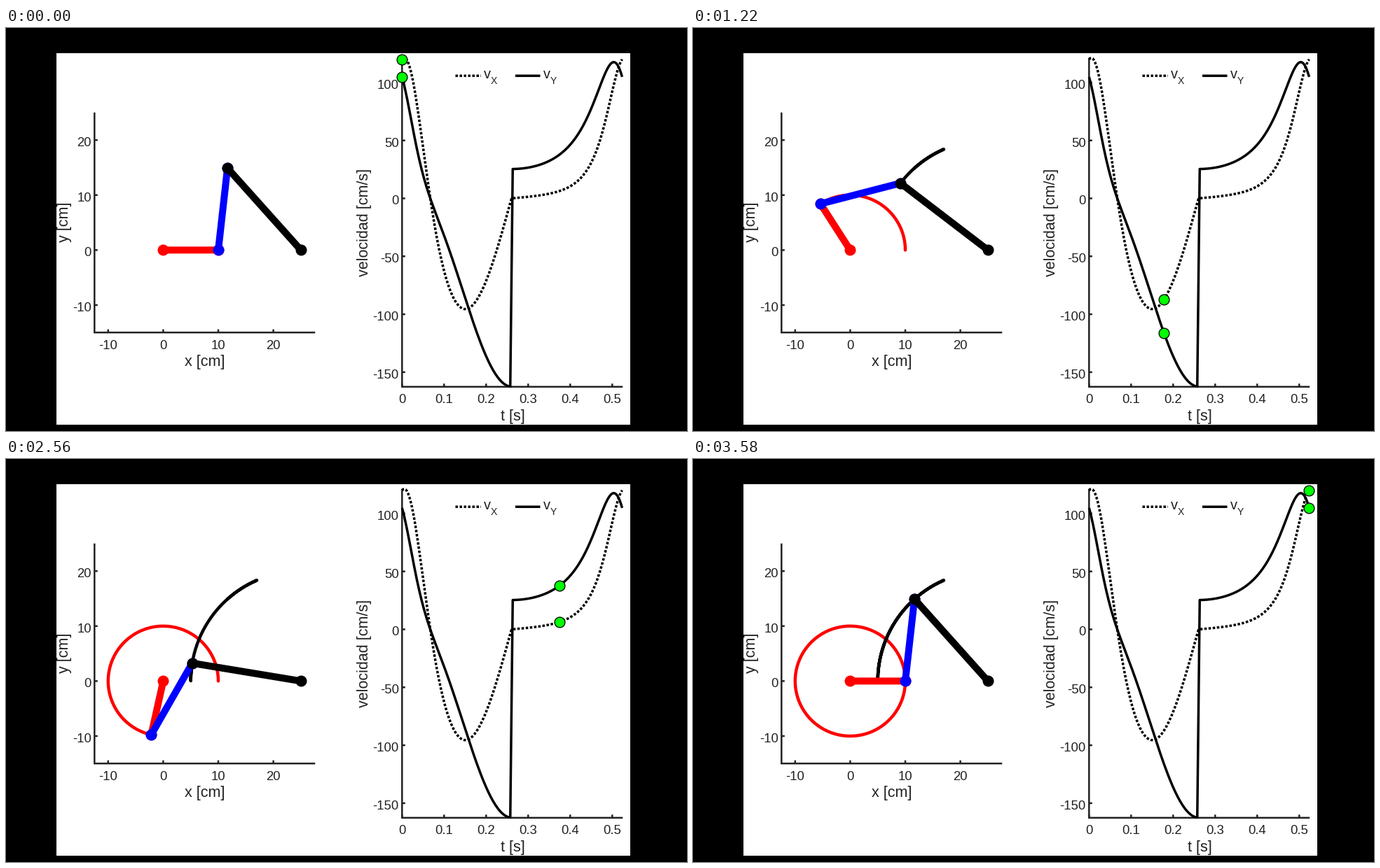
Recreate the animation shown at these times as a matplotlib script. Size 972x576 px, loop 3600 ms.

```python
import numpy as np
import matplotlib.pyplot as plt
from matplotlib.animation import FuncAnimation
from matplotlib.patches import Rectangle

W, H, DPI = 972, 576, 72          # at 72 dpi one point is one pixel
FRAMES, INTERVAL = 180, 20
INK = "#222222"

plt.rcParams["font.family"] = "Liberation Sans"

# Four-bar linkage, lengths in cm
CRANK, COUPLER, ROCKER, GROUND = 10, 15, 20, 25
OMEGA = 12                        # rad/s

theta = np.linspace(0, 2 * np.pi, FRAMES)
time = theta / OMEGA
crank_x, crank_y = CRANK * np.cos(theta), CRANK * np.sin(theta)

# Coupler-rocker joint: upper intersection of the two circles
dx, dy = GROUND - crank_x, -crank_y
dist = np.hypot(dx, dy)
along = (COUPLER**2 - ROCKER**2 + dist**2) / (2 * dist)
across = np.sqrt(np.maximum(COUPLER**2 - along**2, 0))
joint_x = crank_x + (along * dx - across * dy) / dist
joint_y = crank_y + (along * dy + across * dx) / dist


def velocity(pos):
    v = np.diff(pos) / np.diff(time)
    return np.append(v, v[0])


vx, vy = velocity(joint_x), velocity(joint_y)


# Data to pixel mappings
def arm_x(v):
    return 224.4 + 7.86 * np.asarray(v)


def arm_y(v):
    return 317.4 - 7.86 * np.asarray(v)


def vel_x(t):
    return 565.3 + 600 * np.asarray(t)


def vel_y(v):
    return 243.5 - 1.656 * np.asarray(v)


fig = plt.figure(figsize=(W / DPI, H / DPI), dpi=DPI, facecolor="black")
ax = fig.add_axes([0, 0, 1, 1])
ax.set_xlim(0, W)
ax.set_ylim(H, 0)
ax.axis("off")
ax.add_patch(Rectangle((72, 36), 819, 531, color="white", lw=0))


def line(x, y, color, lw, z=2, **kw):
    kw.setdefault("solid_capstyle", "butt")
    return ax.plot(x, y, color=color, lw=lw, zorder=z, snap=False, **kw)[0]


def label(x, y, text, size, ha="center", rotation=0):
    ax.text(x, y, text, size=size, color=INK, ha=ha, va="baseline",
            rotation=rotation, rotation_mode="anchor")


def axes_frame(left, right, top, bottom, xticks, yticks, to_x, to_y):
    line([left, left, right], [top, bottom, bottom], INK, 2.5,
         solid_capstyle="projecting", solid_joinstyle="miter")
    for v in xticks:
        x = to_x(v)
        line([x, x], [bottom, bottom - 4.5], INK, 2.5)
        label(x, bottom + 23.5, f"{v:g}", 18.5)
    for v in yticks:
        y = to_y(v)
        line([left, left + 4.5], [y, y], INK, 2.5)
        label(left - 4.5, y + 9, f"{v:g}", 18.5, ha="right")


axes_frame(126.3, 440, 122, 435.2, (-10, 0, 10, 20), (-10, 0, 10, 20),
           arm_x, arm_y)
label(283.5, 483, "x [cm]", 21.5)
label(89, 277.5, "y [cm]", 21.5, rotation=90)

axes_frame(565.3, 879, 44, 512.8, (0, 0.1, 0.2, 0.3, 0.4, 0.5),
           (-150, -100, -50, 0, 50, 100), vel_x, vel_y)
label(723, 560.5, "t [s]", 21.5)
label(516.5, 277.5, "velocidad [cm/s]", 21.5, rotation=90)

# Velocity curves and legend
DOTS = dict(linestyle=(0, (1, 0.714)), dash_capstyle="butt")
line(vel_x(time), vel_y(vx), "black", 3.5, 3, **DOTS)
line(vel_x(time), vel_y(vy), "black", 3.5, 3, solid_joinstyle="round")
line([641.5, 678], [68.3, 68.3], "black", 3.5, 3, **DOTS)
line([727, 762.5], [68.3, 68.3], "black", 3.5, 3)
for x, sub in ((682, "X"), (767, "Y")):
    label(x, 71.8, "v", 20, ha="left")
    label(x + 9.7, 80, sub, 14, ha="left")

# Moving parts
red_trail = line([], [], "red", 4.5, 4, solid_capstyle="round")
black_trail = line([], [], "black", 4.5, 4, solid_capstyle="round")
links = [line([], [], c, 10, 5 + i, marker="o", ms=16, mew=0)
         for i, c in enumerate(("red", "blue", "black"))]
dots = line([], [], "none", 0, 9, marker="o", ms=14.8, mew=1.3,
            mfc="#00ff00", mec="black")


def update(i):
    pivot = arm_x(0), arm_y(0)
    pin = arm_x(crank_x[i]), arm_y(crank_y[i])
    joint = arm_x(joint_x[i]), arm_y(joint_y[i])
    ground = arm_x(GROUND), arm_y(0)
    ends = (pivot, pin), (pin, joint), (joint, ground)
    for link, (p, q) in zip(links, ends):
        link.set_data([p[0], q[0]], [p[1], q[1]])
    past = slice(0, i + 1)
    red_trail.set_data(arm_x(crank_x[past]), arm_y(crank_y[past]))
    black_trail.set_data(arm_x(joint_x[past]), arm_y(joint_y[past]))
    t = vel_x(time[i])
    dots.set_data([t, t], [vel_y(vx[i]), vel_y(vy[i])])
    return [red_trail, black_trail, *links, dots]


anim = FuncAnimation(fig, update, frames=FRAMES, interval=INTERVAL,
                     repeat=True, repeat_delay=0, blit=False)
plt.show()
```
